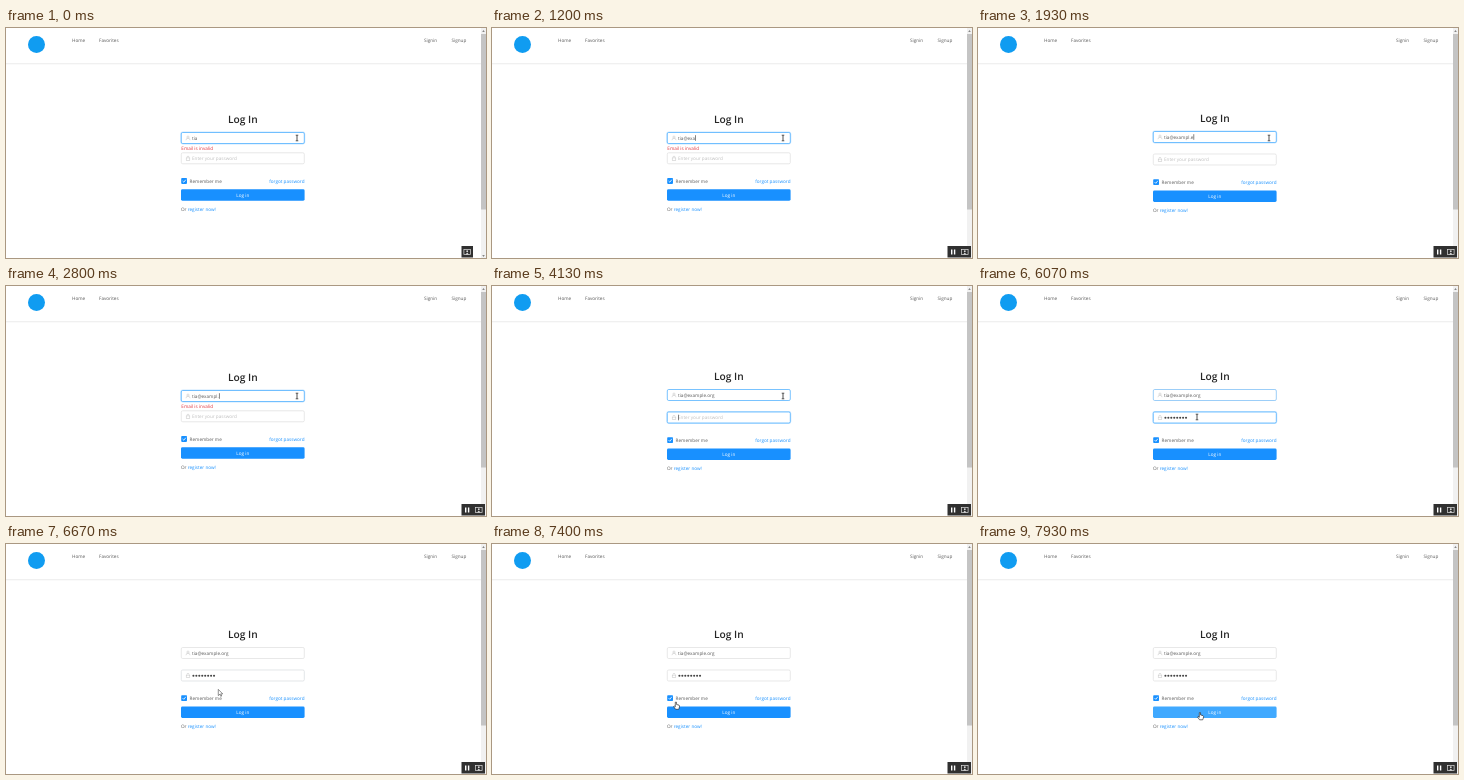
Write an HTML page with a canvas that moves like this. It is 480 px wide and 230 px high and loops after 8000 ms.

```html
<!DOCTYPE html>
<html lang="en">
<head>
<meta charset="utf-8">
<title>Log In</title>
<style>
  html, body { margin: 0; width: 100%; height: 100%; overflow: hidden; background: #fff; }
  canvas { display: block; width: 480px; height: 230px; }
</style>
</head>
<body>
<canvas id="stage"></canvas>
<script>
const W = 480, H = 230, LOOP = 8000;
const BLUE = '#1890ff', TEXT = '#595959', FAINT = '#bfbfbf';
const FONT = '"Open Sans", "Noto Sans", sans-serif';
const canvas = document.getElementById('stage');
const ctx = canvas.getContext('2d');
const dpr = window.devicePixelRatio || 1;
canvas.width = W * dpr;
canvas.height = H * dpr;

const START = 'tia';
const KEYS = [
  [400, '@'], [800, 'e'], [1070, 'x'], [1170, 'a'], [1270, 'm'], [1400, 'p'],
  [1500, 'l'], [1600, '.'], [1800, 'e'], [2400, '<'], [3070, '<'], [3200, 'e'],
  [3330, '.'], [3470, 'o'], [3600, 'r'], [3730, 'g']
];
const PASS_KEYS = [4270, 4400, 4870, 5000, 5130, 5270, 5400, 5530];
const TAB = 3950, LEAVE = 5960, BLUR = 6450, HOVER = 7650;
const PATH = [
  [0, 291, 110], [5930, 291, 110], [6060, 219, 131], [6250, 219, 131],
  [6730, 212, 146], [6800, 212, 146], [7300, 184, 158], [7420, 184, 158],
  [7600, 188, 163.5], [7670, 188, 163.5], [7900, 222, 168.5], [8000, 222, 168.5]
];

const clamp = v => Math.max(0, Math.min(1, v));
const ease = v => { v = clamp(v); return v * v * (3 - 2 * v); };
const ramp = (t, from, span) => ease((t - from) / span);
const mix = (a, b, k) => a + (b - a) * k;
const blend = (a, b, k) => 'rgb(' + a.map((v, i) => Math.round(mix(v, b[i], k))) + ')';

function emailAt(t) {
  let text = START;
  for (const [at, key] of KEYS) {
    if (at > t) break;
    text = key === '<' ? text.slice(0, -1) : text + key;
  }
  return text;
}

function errorAt(t) {
  if (t < 2400) return 1 - ramp(t, 1800, 120);
  return ramp(t, 2400, 300) * (1 - ramp(t, 3470, 200));
}

function caretOn(t) {
  const last = [-600, ...KEYS.map(k => k[0]), TAB, ...PASS_KEYS].filter(k => k <= t).pop();
  return t < BLUR && (t - last) % 1060 < 530;
}

function pointerAt(t) {
  const i = Math.max(1, PATH.findIndex(p => p[0] > t));
  const [a, b] = [PATH[i - 1], PATH[i]];
  const k = ramp(t, a[0], b[0] - a[0]);
  return { x: mix(a[1], b[1], k), y: mix(a[2], b[2], k) };
}

function label(str, x, y, color = TEXT, size = 4.65, align = 'left', weight = 400) {
  ctx.font = `${weight} ${size}px ${FONT}`;
  ctx.textAlign = align;
  ctx.fillStyle = color;
  ctx.fillText(str, x, y + size * 0.34);
  return ctx.measureText(str).width;
}

function rect(x, y, w, h, color) {
  ctx.fillStyle = color;
  ctx.fillRect(x, y, w, h);
}

function round(x, y, w, h, r) {
  ctx.beginPath();
  ctx.roundRect(x, y, w, h, r);
}

function poly(points, color, line, width = 0.6) {
  ctx.beginPath();
  points.forEach(([x, y]) => ctx.lineTo(x, y));
  if (color) { ctx.closePath(); ctx.fillStyle = color; ctx.fill(); }
  if (line) { ctx.strokeStyle = line; ctx.lineWidth = width; ctx.stroke(); }
}

function disc(x, y, r, color) {
  ctx.beginPath();
  ctx.arc(x, y, r, 0, 7);
  ctx.fillStyle = color;
  ctx.fill();
}

function field(cy, active, glow) {
  round(175.3, cy - 5.5, 123, 11, 1.4);
  if (glow > 0) {
    ctx.strokeStyle = `rgba(24,144,255,${0.22 * glow})`;
    ctx.lineWidth = 2;
    ctx.stroke();
  }
  ctx.fillStyle = '#fff';
  ctx.fill();
  ctx.strokeStyle = blend([222, 222, 222], [64, 169, 255], active);
  ctx.lineWidth = 0.7;
  ctx.stroke();
}

function userIcon(x, y) {
  ctx.strokeStyle = FAINT;
  ctx.lineWidth = 0.5;
  ctx.beginPath();
  ctx.arc(x, y - 0.9, 1.1, 0, 7);
  ctx.moveTo(x - 2, y + 2.2);
  ctx.arc(x, y + 2.2, 2, Math.PI, 0);
  ctx.stroke();
}

function lockIcon(x, y) {
  ctx.strokeStyle = FAINT;
  ctx.lineWidth = 0.5;
  ctx.strokeRect(x - 1.8, y - 0.4, 3.6, 2.6);
  ctx.beginPath();
  ctx.arc(x, y - 1, 1.1, Math.PI, 0);
  ctx.stroke();
}

function header() {
  disc(30.5, 16.5, 8.5, '#109cf1');
  label('Home', 66, 12.5);
  label('Favorites', 93, 12.5);
  label('Signin', 418, 12.5);
  label('Signup', 445.5, 12.5);
  rect(0, 35, 475, 1, '#f0f0f0');
  rect(0, 36, 475, 1, '#fafafa');
}

function scrollbar() {
  rect(475, 0, 5, H, '#f1f1f1');
  rect(475, 6, 5, 175.5, '#c4c4c4');
  poly([[476.2, 3.8], [477.5, 2.2], [478.8, 3.8]], '#606060');
  poly([[476.2, 227.2], [477.5, 228.8], [478.8, 227.2]], '#606060');
}

function screenIcon(x, y) {
  ctx.strokeStyle = '#ddd';
  ctx.lineWidth = 0.7;
  ctx.strokeRect(x - 3.3, y - 2.6, 6.6, 5.2);
  poly([[x - 1.6, y + 2.4], [x, y + 0.4], [x + 1.6, y + 2.4]], '#ddd');
  disc(x, y - 0.8, 0.9, '#ddd');
}

function recorder(t) {
  const wide = t >= 70;
  rect(455.5, 218, wide ? 23.5 : 11.5, 11.5, '#303030');
  if (wide) {
    rect(459, 221.5, 1.4, 5, '#fff');
    rect(461.9, 221.5, 1.4, 5, '#fff');
  }
  screenIcon(wide ? 472.8 : 461.2, 224);
}

function form(t) {
  const err = errorAt(t), shift = 1 - err;
  const emailY = 110 - shift, passY = 130.3 + 1.2 * shift;
  const low = 1.1 * shift;
  const onEmail = t < TAB;
  const emailActive = 1 - ramp(t, LEAVE, 300);
  const emailGlow = 1 - ramp(t, TAB, 150);
  const passActive = ramp(t, TAB, 150) * (1 - ramp(t, BLUR, 250));

  label('Log In', 236.8, 91.2 - shift, '#262626', 10.2, 'center', 600);

  field(emailY, emailActive, emailGlow);
  userIcon(182, emailY);
  const textW = label(emailAt(t), 186, emailY);
  if (err > 0) {
    ctx.globalAlpha = err;
    label('Email is invalid', 175.3, 120.5 - shift, '#e0303a');
    ctx.globalAlpha = 1;
  }

  field(passY, passActive, passActive);
  lockIcon(182, passY);
  const count = PASS_KEYS.filter(k => k <= t).length;
  if (!count) label('Enter your password', 186, passY, FAINT);
  for (let i = 0; i < count; i++) disc(187.4 + 2.95 * i, passY + 0.3, 1.05, '#444');

  if (caretOn(t)) {
    const x = onEmail ? 186.3 + textW : 186.3 + count * 2.95;
    rect(x, (onEmail ? emailY : passY) - 2.8, 0.6, 5.6, '#333');
  }

  const checkY = 153 + low;
  round(175.2, checkY - 2.9, 5.8, 5.8, 0.8);
  ctx.fillStyle = BLUE;
  ctx.fill();
  poly([[176.6, checkY], [177.8, checkY + 1.2], [179.8, checkY - 1.3]], null, '#fff', 0.8);
  label('Remember me', 183.6, checkY);
  label('forgot password', 298.5, checkY, BLUE, 4.65, 'right');

  const btnY = 167 + 1.3 * shift;
  round(175, btnY - 5.7, 123.6, 11.4, 1.4);
  ctx.fillStyle = blend([24, 144, 255], [64, 169, 255], ramp(t, HOVER, 220));
  ctx.fill();
  label('Log in', 236.8, btnY, '#fff', 4.65, 'center');

  const orW = label('Or ', 175, 181.4 + low);
  label('register now!', 175 + orW, 181.4 + low, BLUE);
}

function beam() {
  poly([[-1.3, -2.8], [1.3, -2.8]], null, '#222', 0.7);
  poly([[0, -2.8], [0, 2.8]], null, '#222', 0.8);
  poly([[-1.3, 2.8], [1.3, 2.8]], null, '#222', 0.7);
}

function arrow() {
  poly([[0, 0], [0, 6.2], [1.5, 4.9], [2.5, 7], [3.4, 6.6], [2.4, 4.5], [4.4, 4.5], [0, 0]], '#fff', '#222', 0.5);
}

function hand() {
  poly([[-0.7, 0.2], [0.5, 0.2], [0.6, 2.5], [3, 3.1], [3.6, 4], [3.2, 6.1], [2.7, 7.3],
    [-0.4, 7.3], [-2.4, 4.6], [-1.8, 3.9], [-0.7, 4.8], [-0.7, 0.2]], '#fff', '#222', 0.65);
}

function pointer(t) {
  const { x, y } = pointerAt(t);
  const inField = (y > 103 && y < 116) || (y > 125.5 && y < 137.5);
  const onLabel = y > 150 && y < 160 && x < 215;
  ctx.save();
  ctx.translate(x, y);
  if (inField) beam();
  else if (onLabel || y > 162) hand();
  else arrow();
  ctx.restore();
}

function draw(now) {
  const t = now % LOOP;
  ctx.setTransform(dpr, 0, 0, dpr, 0, 0);
  ctx.textRendering = 'geometricPrecision';
  rect(0, 0, W, H, '#fff');
  header();
  form(t);
  scrollbar();
  recorder(t);
  pointer(t);
}

const begin = performance.now();
function tick() {
  draw(performance.now() - begin);
  requestAnimationFrame(tick);
}
tick();
</script>
</body>
</html>
```
